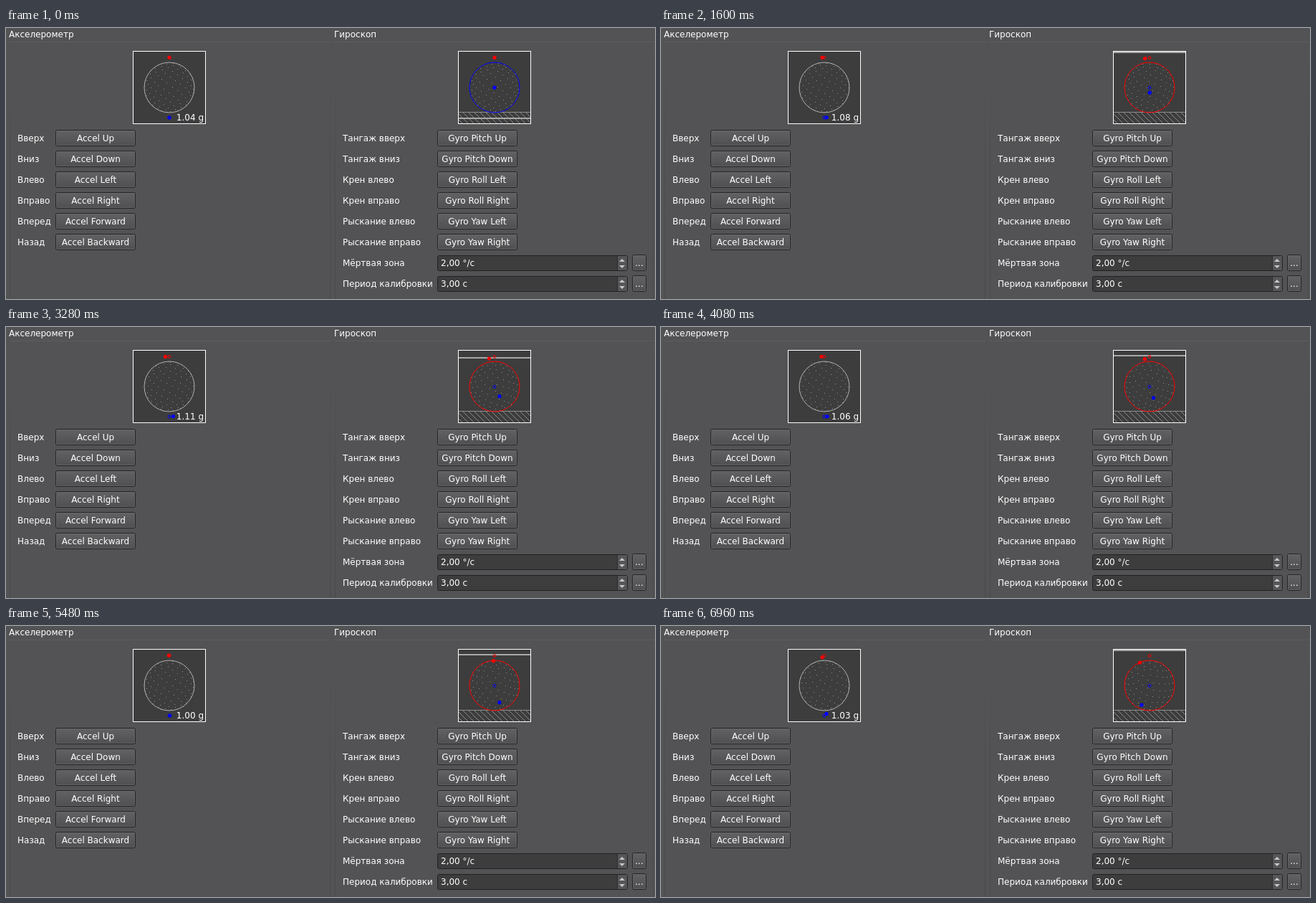
Write an HTML page that moves like this. It is 906 px wide and 378 px high and loops after 7000 ms.

```html
<!DOCTYPE html>
<html lang="ru">
<head>
<meta charset="utf-8">
<title>Калибровка датчиков</title>
<style>
  html, body { margin: 0; width: 100%; height: 100%; overflow: hidden; background: #535355; }
  svg { display: block; width: 906px; height: 378px; }
  text { font: 12px "DejaVu Sans", sans-serif; fill: #fff; white-space: pre; }
</style>
</head>
<body>
<svg id="stage" viewBox="0 0 906 378" xmlns="http://www.w3.org/2000/svg">
  <defs>
    <linearGradient id="raised" x1="0" y1="0" x2="0" y2="1">
      <stop offset="0" stop-color="#626264"/><stop offset="1" stop-color="#4f4f51"/>
    </linearGradient>
    <linearGradient id="edge" gradientUnits="userSpaceOnUse" x1="0" y1="24" x2="0" y2="378">
      <stop offset="0" stop-color="#545456"/><stop offset=".4" stop-color="#4d4d4f"/><stop offset="1" stop-color="#4a4a4c"/>
    </linearGradient>
    <pattern id="hatch" width="8" height="8" patternUnits="userSpaceOnUse">
      <path d="M-1 -1L9 9M-1 7L1 9M7 -1L9 1" stroke="#a0a0a0" stroke-width=".8"/>
    </pattern>
  </defs>
</svg>
<script>
const LOOP = 7000, STEP = 40, POINTS = 180, SPHERE_R = 35, MARK_R = 42;
const stage = document.getElementById('stage');

function add(tag, attrs, content) {
  const node = document.createElementNS('http://www.w3.org/2000/svg', tag);
  for (const key in attrs) node.setAttribute(key, attrs[key]);
  if (content) node.textContent = content;
  stage.appendChild(node);
  return node;
}
const label = (x, y, str, anchor = 'start') => add('text', { x, y, 'text-anchor': anchor }, str);

function panel(x, right, title) {
  add('path', { d: `M${x} 19.5H${right}`, stroke: '#5d5d5f' });
  for (const edge of [x + 1.5, right - .5])
    add('rect', { x: edge - .5, y: 24, width: 1, height: 354, fill: 'url(#edge)' });
  label(x, 13, title);
}

function button(x, y, width, str) {
  add('rect', { x: x + .5, y: y + .5, width: width - 1, height: 22, rx: 2, fill: 'url(#raised)', stroke: '#242426' });
  add('rect', { x: x + 1.5, y: y + 1.5, width: width - 3, height: 20, rx: 1, fill: 'none', stroke: '#69696b', 'stroke-opacity': .7 });
  label(x + width / 2, y + 16, str, 'middle');
}

function spinBox(y, str) {
  add('rect', { x: 602.5, y: y + .5, width: 265, height: 21, rx: 2, fill: '#3d3d3e', stroke: '#222224' });
  add('rect', { x: 853, y: y + 1, width: 14, height: 20, fill: '#565658' });
  add('path', { d: `M853.5 ${y + 1}v20`, stroke: '#2b2b2d' });
  add('path', { d: `M856 ${y + 9}l4 -4l4 4zM856 ${y + 14}l4 4l4 -4z`, fill: '#c8c8c8' });
  label(607, y + 15, str);
  button(874, y - 1, 20, '...');
}

function rows(x, buttonX, items) {
  items.forEach(([name, action], i) => {
    label(x, 158 + 29 * i, name);
    if (action) button(buttonX, 142 + 29 * i, 112, action);
  });
}

const viewBox = (cx) => add('rect', { x: cx - 50.5, y: 32.5, width: 101, height: 101, fill: '#3d3d3d', stroke: '#fff' });

function globe(cx) {
  const dots = add('path', { stroke: '#909090', 'shape-rendering': 'crispEdges' });
  const rim = add('circle', { cx, cy: 83, r: SPHERE_R, fill: 'none', stroke: '#b0b0b0' });
  return { cx, dots, rim };
}
const ring = (cx, cy, stroke) => add('circle', { cx, cy, r: 1.9, fill: 'none', stroke });
const spot = (fill) => add('circle', { r: 2.6, fill });

panel(4, 453, 'Акселерометр');
panel(458, 904, 'Гироскоп');
rows(16, 69, [
  ['Вверх', 'Accel Up'], ['Вниз', 'Accel Down'], ['Влево', 'Accel Left'],
  ['Вправо', 'Accel Right'], ['Вперед', 'Accel Forward'], ['Назад', 'Accel Backward']
]);
rows(470, 602, [
  ['Тангаж вверх', 'Gyro Pitch Up'], ['Тангаж вниз', 'Gyro Pitch Down'],
  ['Крен влево', 'Gyro Roll Left'], ['Крен вправо', 'Gyro Roll Right'],
  ['Рыскание влево', 'Gyro Yaw Left'], ['Рыскание вправо', 'Gyro Yaw Right'],
  ['Мёртвая зона'], ['Период калибровки']
]);
spinBox(317, '2,00 °/с');
spinBox(346, '3,00 с');

viewBox(228);
const accel = globe(228);
ring(228, 41.3, '#f00');
ring(228, 125, '#00f');
const accelUp = spot('#f00'), accelDown = spot('#00f');
const force = label(276, 129, '', 'end');

viewBox(682);
add('rect', { x: 632, y: 118, width: 100, height: 15, fill: 'url(#hatch)' });
add('path', { d: 'M632 117.5H732', stroke: '#8c8c8c' });
const rateLine = add('path', { stroke: '#a8a8a8', 'stroke-width': 2 });
const gyro = globe(682);
ring(682, 41.5, '#f00');
ring(682, 83.3, '#00f');
const gyroUp = spot('#f00'), gyroFront = spot('#00f');

// Fibonacci lattice on the unit sphere
const lattice = Array.from({ length: POINTS }, (_, i) => {
  const y = 1 - (2 * i + 1) / POINTS, r = Math.sqrt(1 - y * y), a = i * Math.PI * (3 - Math.sqrt(5));
  return [r * Math.cos(a), y, r * Math.sin(a)];
});

const TIMES = [0, 920, 2240, 3280, 4840, 6160, 6960];
const KEYS = {
  accelX: [0, -.7, -5, -5.5, -2, 0, -3],
  accelY: [-42, -42, -41.7, -41.6, -41.9, -42, -39.4],
  force: [1.04, 1.05, 1.1, 1.11, 1.01, 1, 1.03],
  upX: [0, 0, -12, -7.5, -6, 3, -13.5],
  upY: [-42, -41.8, -39.2, -39, -37, -32, -32],
  frontX: [0, 0, 1, 7, 4, 10, -11],
  frontY: [0, 4, 10, 13.7, 18.3, 28, 27]
};
const RATE_TIMES = [0, 160, 560, 1040, 1120, 1200, 1720, 1800, 1880, 3120, 3280, 3400, 3960, 4040, 4120,
  4520, 4600, 4680, 5360, 5440, 5520, 6280, 6360, 6440];
const RATE_Y = [126, 122, 34, 34, 46, 34, 34, 46, 34, 34, 43, 34, 34, 46, 34, 34, 46, 34, 34, 46, 34, 34, 46, 34];

function segment(times, t) {
  let i = 0;
  while (i < times.length - 2 && times[i + 1] <= t) i++;
  return [i, Math.min(1, (t - times[i]) / (times[i + 1] - times[i]))];
}
function linear(times, values, t) {
  const [i, u] = segment(times, t);
  return values[i] + (values[i + 1] - values[i]) * u;
}
// Cubic Hermite curve with limited slopes, so it never overshoots a key
function smooth(values, t) {
  const [i, u] = segment(TIMES, t), span = TIMES[i + 1] - TIMES[i];
  const chord = k => (values[k + 1] - values[k]) / (TIMES[k + 1] - TIMES[k]);
  const slope = k => {
    if (k === 0) return 0;
    if (k === TIMES.length - 1) return chord(k - 1);
    const a = chord(k - 1), b = chord(k);
    return a * b <= 0 ? 0 : 2 * a * b / (a + b);
  };
  const v = 1 - u;
  return v * v * (1 + 2 * u) * values[i] + u * u * (3 - 2 * u) * values[i + 1]
    + span * u * v * (v * slope(i) - u * slope(i + 1));
}

const unit = v => { const n = Math.hypot(...v); return v.map(c => c / n); };
const cross = (a, b) => [a[1] * b[2] - a[2] * b[1], a[2] * b[0] - a[0] * b[2], a[0] * b[1] - a[1] * b[0]];
const depth = (x, y) => Math.sqrt(Math.max(0, 1 - x * x - y * y));

function place(node, cx, v) {
  node.setAttribute('cx', cx + v[0] * MARK_R);
  node.setAttribute('cy', 83 + v[1] * MARK_R);
}

function turn(view, up, front) {
  const side = cross(front, up);
  let d = '';
  for (const [a, b, c] of lattice) {
    const [x, y, z] = [0, 1, 2].map(k => a * side[k] + b * up[k] + c * front[k]);
    if (z > 0) d += `M${Math.round(view.cx + x * SPHERE_R - .5)} ${Math.round(82.5 + y * SPHERE_R) + .5}h1`;
  }
  view.dots.setAttribute('d', d);
}

function draw(time) {
  const t = Math.floor(time % LOOP / STEP) * STEP;
  const at = name => smooth(KEYS[name], t);

  const ax = at('accelX') / MARK_R, ay = at('accelY') / MARK_R;
  const gravity = unit([ax, ay, depth(ax, ay)]);
  turn(accel, gravity, unit(gravity.map((c, k) => (k === 2) - c * gravity[2])));
  place(accelUp, 228, gravity);
  place(accelDown, 228, gravity.map(c => -c));
  force.textContent = at('force').toFixed(2) + ' g';

  const fx = at('frontX') / MARK_R, fy = at('frontY') / MARK_R, fz = depth(fx, fy);
  const ux = at('upX') / MARK_R, uy = at('upY') / MARK_R;
  const up = unit([ux, uy, -(ux * fx + uy * fy) / fz]), front = [fx, fy, fz];
  turn(gyro, up, front);
  place(gyroUp, 682, [ux, uy]);
  place(gyroFront, 682, front);

  const y = Math.round(linear(RATE_TIMES, RATE_Y, t));
  rateLine.setAttribute('d', `M632 ${y}H732`);
  gyro.rim.setAttribute('stroke', y < 118 ? '#f00' : '#00f');
}

const start = performance.now();
function tick() {
  draw(performance.now() - start);
  requestAnimationFrame(tick);
}
tick();
</script>
</body>
</html>
```
